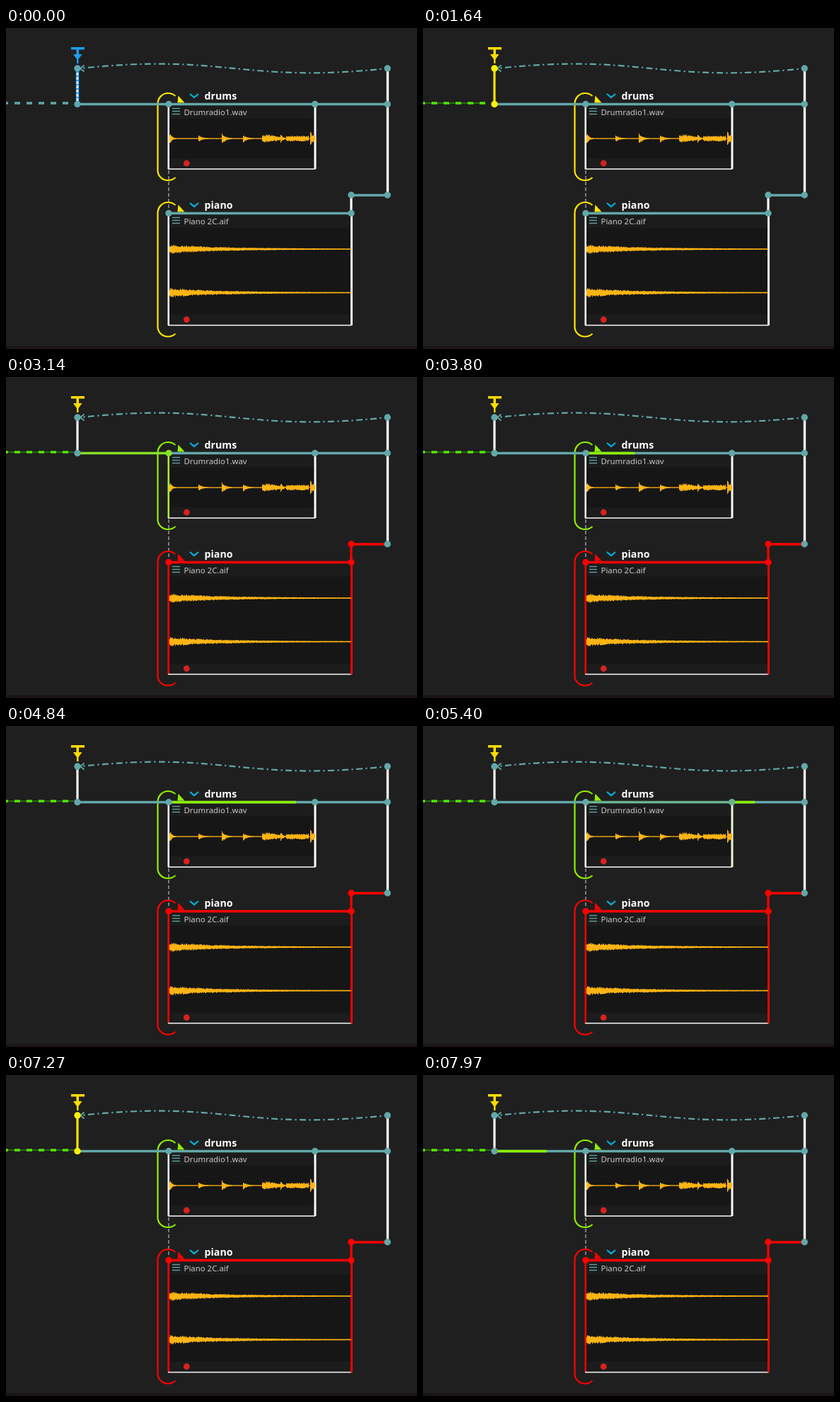
Animation, 581 px wide and 453 px high, one loop 8 s. Source, as an HTML page with a canvas:

```html
<!DOCTYPE html>
<html>
<head>
<meta charset="utf-8">
<style>
html, body { margin: 0; width: 100%; height: 100%; overflow: hidden; background: #1f1f1f; }
canvas { display: block; }
</style>
</head>
<body>
<canvas id="stage" width="581" height="453"></canvas>
<script>
const ctx = document.getElementById('stage').getContext('2d');
const LOOP = 8000, FADE = 500;
const TEAL = [99, 168, 169], WHITE = [250, 250, 250], PULSE = [143, 240, 0];
const GREEN = '#8ff000', RED = '#ff0000', YELLOW = '#ffe800', BLUE = '#1e9cf0', AMBER = '#ffb414';

// Moments when the playhead reaches each part
const ARM = 500, TRIGGER_LIT = 1400, FIRE = 1880, BOXES = 3080, DRUMS_START = 3150,
      DRUMS_END = 5100, END = 6060, REFIRE = 7280;
const SPEED = 0.1065;

const rgb = c => `rgb(${c.map(Math.round).join()})`;

// Colour that flashes green at each given moment and fades back to its base
function glow(base, t, ...moments) {
  for (const m of moments) {
    const p = (t - m) / FADE;
    if (p >= 0 && p < 1) {
      const k = 1 - (1 - p) ** 2;
      return rgb(PULSE.map((v, i) => v + (base[i] - v) * k));
    }
  }
  return rgb(base);
}

function line(x1, y1, x2, y2, color, width = 3.4, dash = [], offset = 0) {
  ctx.strokeStyle = color;
  ctx.lineWidth = width;
  ctx.setLineDash(dash);
  ctx.lineDashOffset = offset;
  ctx.beginPath();
  ctx.moveTo(x1, y1);
  ctx.lineTo(x2, y2);
  ctx.stroke();
  ctx.setLineDash([]);
}

function dot(x, y, color, r = 4.7) {
  ctx.fillStyle = color;
  ctx.beginPath();
  ctx.arc(x, y, r, 0, 7);
  ctx.fill();
}

function shape(path, color, width) {
  const p = new Path2D(path);
  ctx.lineWidth = width;
  ctx.fillStyle = ctx.strokeStyle = color;
  width ? ctx.stroke(p) : ctx.fill(p);
}

function text(s, x, y, font, color) {
  ctx.font = font + ' "Noto Sans", sans-serif';
  ctx.fillStyle = color;
  ctx.fillText(s, x, y);
}

function wave(x1, x2, y, amplitude, seed) {
  const random = () => (seed = (seed * 16807) % 2147483647) / 2147483647;
  ctx.fillStyle = AMBER;
  for (let x = x1; x < x2; x++) {
    const a = amplitude(x);
    const up = 0.5 + a * (0.5 + 0.5 * random()), down = 0.5 + a * (0.5 + 0.5 * random());
    ctx.fillRect(x, y - up, 1, up + down);
  }
}

// Hits as [x, height, decay length]
const hits = [[231, 8, 3], [272, 4.5, 5], [305, 10, 4], [335, 5, 5], [388, 6, 3], [430, 9, 9]];
function drumLevel(x) {
  let a = 0.2;
  for (const [at, h, d] of hits) if (x >= at) a = Math.max(a, h * Math.exp((at - x) / d));
  if (x > 361 && x < 388) a = Math.max(a, 5.5 - Math.abs(x - 369) * 0.18);
  if (x > 395 && x < 428) a = Math.max(a, 3.6);
  return a;
}
const pianoLevel = x => 0.2 + 6 * Math.exp((231 - x) / 75);

function box(top, right, bottom, title, file, c) {
  line(230, top, 230, bottom, c.left, 3);
  ctx.fillStyle = '#1c1c1c';
  ctx.fillRect(231, top, right - 231, bottom - top);
  ctx.fillStyle = '#161616';
  ctx.fillRect(232, top + 20, right - 233, bottom - top - 35);
  line(229, bottom, right, bottom, rgb(WHITE), 1.3);
  line(right, top, right, bottom, c.right, 3);

  const b = bottom + 16;
  shape(`M239.5 ${top - 11.5}Q235 ${top - 15.5} 229 ${top - 15.5}C221 ${top - 15.5} 214.5 ${top - 9} 214.5 ${top}` +
        `V${b - 14}C214.5 ${b - 6} 221 ${b} 229 ${b}Q235 ${b} 239.5 ${b - 4}`, c.bracket, 2.2);
  shape(`M243.5 ${top - 12}L252.5 ${top - 2}H242.5Z`, c.bracket);

  shape(`M260 ${top - 14.5}l6 5 6 -5`, '#03b4dc', 2.2);
  text(title, 280.5, top - 6.5, 'bold 14.2px', '#fff');
  for (const dy of [6, 10, 14]) line(235, top + dy, 246, top + dy, rgb(TEAL), 1.3);
  text(file, 251.5, top + 15.3, '11.4px', '#c9c9c9');
  dot(255.3, bottom - 8, '#d9221e', 4.4);
}

function trigger(color) {
  shape('M92 27h19v3.4h-8v6.6h4.5l-5 7v6h-2.5v-6l-5 -7h4.5v-6.6h-7.5z', color);
}

function loopCurve(color) {
  ctx.setLineDash([9, 4.4, 2.2, 4.4]);
  shape('M539 57C335 79 310 35 105 57', color, 2.2);
  ctx.setLineDash([]);
  shape('M110.5 52.5L105 57l5.500 4.500', color, 1.8);
}

function entry(t) {
  const head = Math.max(0, Math.min(96, (t - ARM) * 88 / 1140));
  const dashes = (from, to, color) => {
    if (to > from) line(from, 106, to, 106, color, 3.4, [8, 9], from + 5);
  };
  dashes(head, 96, rgb(TEAL));
  if (head > 0) {
    line(0, 106, head, 106, '#42b00c', 1);
    dashes(0, head, '#4fe800');
  }
}

function draw(t) {
  ctx.fillStyle = '#1f1f1f';
  ctx.fillRect(0, 0, 581, 453);
  ctx.fillStyle = '#1b1515';
  ctx.fillRect(0, 449, 581, 4);

  const teal = (...m) => glow(TEAL, t, ...m);
  const white = (...m) => glow(WHITE, t, ...m);
  const running = t >= BOXES;
  const waiting = (t >= ARM && t < FIRE) || (t >= END && t < REFIRE);

  entry(t);
  loopCurve(teal(END));
  line(230, 201, 230, 260, '#858585', 1.8, [5, 3]);

  box(107.5, 437, 199, 'drums', 'Drumradio1.wav', {
    left: white(BOXES), right: white(DRUMS_END), bracket: running ? GREEN : YELLOW
  });
  const pianoSide = running ? RED : rgb(WHITE), pianoTop = running ? RED : rgb(TEAL);
  box(261.5, 488.5, 419.5, 'piano', 'Piano 2C.aif', {
    left: pianoSide, right: pianoSide, bracket: running ? RED : YELLOW
  });
  wave(231, 437, 156, drumLevel, 41);
  wave(231, 488, 312, pianoLevel, 77);
  wave(231, 488, 373.5, pianoLevel, 123);

  // Vertical conditions
  line(539.5, 57, 539.5, 236, white(END), 3.4);
  line(488, 236, 488, 262, pianoSide, 3.2);
  if (t < ARM) {
    line(101, 57, 101, 107, BLUE, 4.4);
    line(101, 57, 101, 107, rgb(WHITE), 2.6, [4, 2]);
  } else {
    line(101, 57, 101, 107, waiting ? YELLOW : white(FIRE, REFIRE), 3.2);
  }

  // Horizontal intervals and the playhead's trail
  line(101, 107.5, 230, 107.5, teal(BOXES));
  line(230, 107.5, 437, 107.5, teal(DRUMS_END));
  line(437, 107.5, 539, 107.5, teal(END));
  line(230, 261.5, 488, 261.5, pianoTop);
  line(488, 236, 539, 236, pianoTop);
  const trail = (from, start, stop) => {
    if (t > start && t < stop) line(from, 107.5, from + (t - start) * SPEED, 107.5, GREEN);
  };
  trail(101.5, FIRE, BOXES);
  trail(230, DRUMS_START, DRUMS_END);
  trail(437, DRUMS_END, END);
  trail(101, REFIRE, LOOP);

  const startNode = waiting ? '#fff200' : teal(FIRE, REFIRE);
  for (const y of [57, 107.5]) {
    dot(101, y, startNode);
    if (t < ARM) {
      ctx.setLineDash([2, 2]);
      shape(`M97 ${y}a4 4 0 1 0 8 0a4 4 0 1 0 -8 0`, BLUE, 1);
      ctx.setLineDash([]);
    }
  }
  for (const y of [57, 107.5, 235.7]) dot(539.3, y, teal(END));
  dot(230, 107.5, teal(BOXES));
  dot(436.7, 107.5, teal(DRUMS_END));
  dot(230, 261.5, pianoTop);
  dot(488, 261.5, pianoTop);
  dot(488, 235.7, pianoTop);

  trigger(t < TRIGGER_LIT ? BLUE : '#ffdc00');
}

function tick() {
  draw(performance.now() % LOOP);
  requestAnimationFrame(tick);
}
tick();
</script>
</body>
</html>
```
